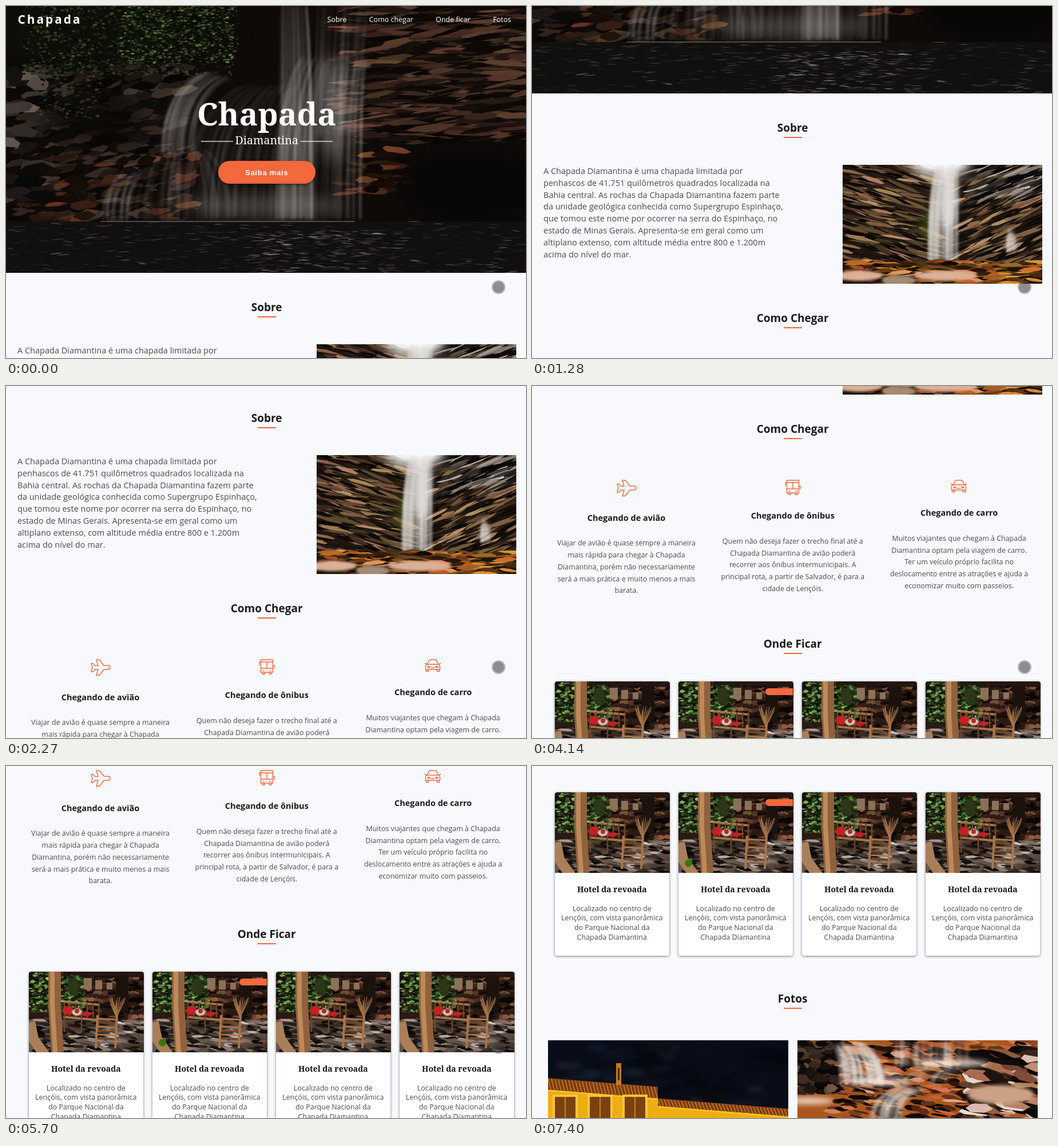
Recreate the animation shown at these times as an HTML page with a canvas. Size 909 by 616 pixels, loop 8 s.

```html
<!DOCTYPE html>
<html lang="pt-BR">
<head>
<meta charset="utf-8">
<title>Chapada Diamantina</title>
<style>
html, body { margin: 0; width: 100%; height: 100%; overflow: hidden; background: #f8f9fc; }
#stage { position: fixed; inset: 0; overflow: hidden; contain: strict; }
#page { position: absolute; inset: 0; }
canvas, .card, svg, nav { position: absolute; }
svg { left: 0; top: 0; overflow: visible; }
.card { top: 1302px; width: 200.5px; height: 286px; border-radius: 4px; background: #fff; box-shadow: 0 1px 4px rgba(0,0,0,.5); }
.card canvas { border-radius: 4px 4px 0 0; }
nav { right: 26px; top: 15px; display: flex; gap: 39.3px; font: 12.48px/17px "Open Sans", sans-serif; color: #fff; }
nav :first-child { height: 21px; border-bottom: 1.6px solid #dc603b; }
#dot { position: absolute; left: 849px; top: 480px; width: 20px; height: 20px; border-radius: 50%;
  border: 2px solid rgba(90,88,82,.42); background: rgba(60,60,60,.57); background-clip: padding-box; }
text { font-family: "Open Sans", sans-serif; fill: #4c4c4c; }
.logo { font-size: 20.8px; font-weight: 700; letter-spacing: 3px; fill: #fff; }
.hero { font: bold 55px "Noto Serif", serif; fill: #fff; }
.sub { font: 300 19.6px "Noto Serif", serif; fill: #fff; }
.btn { font: bold 13px "Liberation Sans", Arial, sans-serif; letter-spacing: .75px; fill: #fff; }
.h2 { font-size: 19px; font-weight: 700; fill: #1c1a1a; }
.h3 { font-size: 14.5px; font-weight: 700; fill: #1c1a1a; }
.lead { font-size: 14.5px; }
.copy { font-size: 12.48px; }
.hotel { font: 600 14px "Noto Serif", serif; fill: #111; }
.icon { fill: none; stroke: #ee6a3e; stroke-width: 1.4; stroke-linejoin: round; stroke-linecap: round; }
</style>
</head>
<body>
<div id="stage"><div id="page"></div><div id="dot"></div></div>
<script>
const page = document.getElementById('page');
const ORANGE = '#f4683d', MID = 455.7;
let seed;
const rnd = (a = 0, b = 1) => {
  seed = (seed * 1664525 + 1013904223) >>> 0;
  return a + (b - a) * seed / 4294967296;
};

// ---------- photo helpers ----------
function photo(parent, x, y, w, h, paint) {
  const c = document.createElement('canvas');
  c.width = w; c.height = h;
  c.style.left = x + 'px'; c.style.top = y + 'px';
  parent.append(c);
  seed = 7;
  paint(c.getContext('2d'), w, h);
}
function box(g, color, x, y, w, h) { g.fillStyle = color; g.fillRect(x, y, w, h); }
function line(g, color, width, ...p) {
  g.strokeStyle = color; g.lineWidth = width;
  g.beginPath();
  for (let i = 0; i < p.length; i += 2) g.lineTo(p[i], p[i + 1]);
  g.stroke();
}
function glow(g, color, x, y, rx, ry, blur) {
  g.filter = `blur(${blur}px)`;
  g.fillStyle = color;
  g.beginPath(); g.ellipse(x, y, rx, ry, 0, 0, 7); g.fill();
  g.filter = 'none';
}
// slabs, leaves or ripples: mostly dark, a few lit
function scatter(g, n, [x, y, w, h], { hue = 20, sat = 30, max = 30, len = 40, thick = 8, tilt = 0, alpha = 1 }) {
  g.filter = 'blur(.5px)';
  for (let i = 0; i < n; i++) {
    const l = rnd(len / 4, len / 2), t = rnd(thick / 6, thick / 2);
    g.save();
    g.translate(x + rnd(0, w), y + rnd(0, h));
    g.rotate(tilt + rnd(-.15, .15));
    g.fillStyle = `hsla(${hue + rnd(-8, 8)},${sat}%,${3 + max * rnd() ** 2}%,${alpha})`;
    g.beginPath();
    for (let a = 0; a < 6; a++) g.lineTo(l * Math.cos(a + rnd(-.3, .3)), t * Math.sin(a));
    g.fill();
    g.restore();
  }
  g.filter = 'none';
}
// threads of water that leave an upper edge and curve down to a lower one
function fall(g, n, [x0, x1, y0], [x2, x3, y1], alpha) {
  g.filter = 'blur(2px)';
  g.lineWidth = 4;
  for (let i = 0; i < n; i++) {
    const k = rnd(), a = x0 + (x1 - x0) * k, b = x2 + (x3 - x2) * k, top = y0 + rnd(0, 15);
    const fade = g.createLinearGradient(0, top, 0, y1), glint = rnd(alpha / 4, alpha);
    [.4, 1, .6].forEach((s, j) => fade.addColorStop(j / 2, `rgba(228,224,220,${glint * s})`));
    g.strokeStyle = fade;
    g.beginPath();
    g.moveTo(a, top);
    g.quadraticCurveTo(b, top + (y1 - top) / 5, b, y1 - rnd(0, 8));
    g.stroke();
  }
  g.filter = 'none';
}

// ---------- photos ----------
function river(g, w, h) {
  const shore = 377;
  box(g, '#0e0a08', 0, 0, w, h);
  scatter(g, 420, [0, 100, 320, 275], { sat: 20, max: 22, len: 60, thick: 22, tilt: -.2 });
  scatter(g, 90, [40, 260, 290, 110], { sat: 48, max: 24, len: 55, thick: 18, tilt: -.2 });
  scatter(g, 30, [0, 110, 70, 230], { sat: 10, max: 38, len: 70, thick: 30 });
  scatter(g, 620, [590, 0, 320, 235], { sat: 34, max: 25, len: 95, thick: 13, tilt: -.08 });
  scatter(g, 60, [590, 250, 100, 80], { sat: 52, max: 27, len: 60, thick: 18 });
  glow(g, '#090706', 810, 315, 125, 70, 18);
  glow(g, '#0a0806', 150, 195, 80, 40, 22);
  glow(g, '#0c0f08', 180, 40, 220, 60, 16);
  scatter(g, 1500, [30, -5, 370, 125], { hue: 80, sat: 28, max: 20, len: 9, thick: 5 });
  scatter(g, 700, [200, 0, 205, 100], { hue: 82, sat: 38, max: 34, len: 8, thick: 4 });
  scatter(g, 250, [60, 100, 110, 100], { hue: 80, sat: 25, max: 18, len: 9, thick: 5 });

  fall(g, 60, [480, 525, -10], [478, 535, shore], .14);
  fall(g, 50, [545, 640, -10], [540, 625, 230], .1);
  fall(g, 80, [515, 630, 85], [470, 620, shore], .13);
  fall(g, 70, [410, 540, 135], [310, 520, shore], .11);
  fall(g, 50, [340, 395, 112], [270, 330, 262], .15);
  fall(g, 50, [280, 350, 245], [240, 400, shore], .1);
  fall(g, 25, [200, 250, 288], [168, 230, shore], .18);
  glow(g, 'rgba(225,222,218,.3)', 570, 180, 24, 90, 14);
  glow(g, 'rgba(225,222,218,.22)', 450, 350, 140, 18, 12);

  box(g, '#12100f', 0, shore, w, h);
  line(g, 'rgba(200,195,190,.45)', 1.5, 165, shore, 610, shore);
  const ripple = { sat: 8, max: 75, len: 26, thick: 2, alpha: .35 };
  scatter(g, 500, [0, shore, w, h - shore], ripple);
  scatter(g, 330, [420, shore + 15, 270, h - shore], { ...ripple, max: 95, alpha: .45 });
}

function canyon(g, w, h) {
  const stone = { hue: 28, sat: 32, max: 55, len: 70, thick: 8 };
  box(g, '#21170f', 0, 0, w, h);
  scatter(g, 420, [0, -5, 165, 180], { ...stone, tilt: .25 });
  scatter(g, 420, [195, -5, 160, 190], { ...stone, tilt: -.4 });
  scatter(g, 60, [220, 0, 130, 60], { ...stone, sat: 8, max: 80, tilt: -.4 });
  glow(g, 'rgba(70,78,28,.7)', 150, 105, 14, 30, 8);
  glow(g, '#fff', 172, -2, 50, 22, 10);
  glow(g, 'rgba(255,255,255,.8)', 183, 50, 16, 60, 7);
  fall(g, 75, [165, 202, -5], [150, 202, 172], .45);
  fall(g, 14, [292, 297, 108], [286, 304, 156], .6);
  glow(g, '#a5601f', w / 2, 194, w / 2, 16, 4);
  scatter(g, 160, [0, 168, w, 40], { hue: 28, sat: 65, max: 60, len: 50, thick: 9 });
  for (const [x, r] of [[28, 42], [180, 56]]) glow(g, '#dcb096', x, 194, r, 9, 2);
  glow(g, '#a28a75', 98, 202, 30, 9, 2);
}

function porch(g, w, h) {
  const wood = '#a8764a', dark = '#70462a', floor = 84;
  box(g, '#2a1a12', 0, 0, w, h);
  scatter(g, 500, [0, 0, 100, 70], { hue: 95, sat: 38, max: 60, len: 11, thick: 6 });
  scatter(g, 150, [100, 0, 100, 85], { sat: 38, max: 40, len: 20, thick: 10 });
  line(g, '#24160f', 12, 60, 0, w, 4);
  glow(g, '#2c3718', 78, 26, 10, 17, 2);
  for (let i = 0; i < 3; i++) box(g, '#8b7159', 96 + i * 20, 11 + i * 4, 14 - i * 2, 20 - i * 4);
  box(g, '#1b120d', 152, 8, 22, 62);
  box(g, '#685648', 0, floor, w, h);
  scatter(g, 200, [0, floor, w, h - floor], { sat: 13, max: 75, len: 34, thick: 8, tilt: .12 });
  glow(g, 'rgba(30,18,10,.65)', 100, 94, 44, 10, 6);
  glow(g, 'rgba(25,15,10,.5)', w, h, 45, 25, 10);
  // bench
  for (const y of [52, 79]) line(g, wood, 4, 60, y, 124, y + 6);
  for (let x = 62; x <= 122; x += 10) line(g, dark, 2.5, x, 54, x, x % 30 === 2 ? 106 : 80);
  ['#c81f24', '#d9cdbd', '#c81f24'].forEach((c, i) => glow(g, c, 68 + i * 16, 68 + i * 3, 9, 8 - i * 2, .8));
  glow(g, '#be2428', 84, 69, 4, 4, .5);
  // dry grass and chair
  for (let i = 0; i < 24; i++) line(g, wood, .8, 153, 80, 153 + rnd(-16, 16), rnd(42, 56));
  for (let y = 82; y < 118; y += 7) line(g, y % 2 ? dark : wood, 3, 121, y, 153, y + 2);
  for (const x of [120, 154]) line(g, wood, 4, x, 76, x - 3, 134);
  // tree posts
  line(g, '#8f613d', 22, 45, 0, 45, 60, 50, h);
  line(g, '#bd8a5b', 8, 41, 0, 41, 60, 46, h);
  line(g, '#a97f59', 18, 2, 88, 8, 118, 30, h + 8);
}

function village(g, w, h) {
  box(g, '#080d19', 0, 0, w, h);
  for (let i = 0; i < 70; i++)
    glow(g, `hsla(222,${rnd(15, 45)}%,${3 + 19 * rnd() ** 2}%,.8)`, rnd(0, w), rnd(8, 110), rnd(8, 40), rnd(2, 8), 4);
  // a tiled roof above a lit wall
  const house = (x, y, width, roof) => {
    g.save();
    g.transform(1, .08, 0, 1, x, y);
    box(g, '#edae14', 0, roof, width, h);
    box(g, '#7b3b12', 0, 0, width, roof);
    for (let t = 0; t < width; t += 6) line(g, '#d5841d', 1.5, t, 1, t + 5, roof);
    line(g, '#ffc52e', 2, 0, roof + 2, width, roof + 2);
    g.restore();
  };
  house(185, 101, w, 13);
  house(0, 66, 192, 20);
  box(g, '#c17e16', 119, 40, 9, 38);
  box(g, '#4d270d', 122, 48, 3, 22);
  for (let x = 8; x < 180; x += 61) {
    box(g, '#ffc636', x, 95, 44, h);
    box(g, '#7a4210', x + 4, 99, 36, h);
    line(g, '#c8811b', 2, x + 22, 99, x + 22, h);
  }
}

function cascade(g, w, h) {
  box(g, '#a9561f', 0, 0, w, h);
  scatter(g, 420, [60, 0, 360, h], { sat: 58, max: 68, len: 44, thick: 11, tilt: .15 });
  scatter(g, 150, [0, 0, 70, 90], { sat: 28, max: 35, len: 30, thick: 18 });
  scatter(g, 110, [300, 20, 130, 125], { sat: 38, max: 85, len: 75, thick: 24, tilt: .2 });
  glow(g, '#cda185', 355, 95, 58, 17, 3);
  fall(g, 60, [62, 110, 2], [75, 150, 80], .6);
  fall(g, 55, [165, 300, -5], [165, 300, 50], .4);
  fall(g, 40, [150, 300, 46], [100, 270, 80], .35);
  fall(g, 30, [175, 225, 76], [125, 180, h], .5);
  for (let i = 0; i < 3; i++) glow(g, 'rgba(255,244,235,.8)', 20 + i * 125, 106 - i * 33, 45 + i * 10, 6, 5);
}

photo(page, 0, 0, 909, 467, river);
photo(page, 543, 592, 349, 208, canyon);
photo(page, 28, 1736, 420, 144, village);
photo(page, 464, 1736, 420, 144, cascade);

// ---------- text and icons ----------
let art = '';
const text = (cls, x, y, s, anchor = 'middle') =>
  art += `<text class="${cls}" x="${x}" y="${y}" text-anchor="${anchor}">${s}</text>`;
const para = (cls, x, y, step, lines, anchor) => lines.split('|').forEach((s, i) => text(cls, x, y + i * step, s, anchor));
const bar = (x, y, w, h, color) => art += `<rect x="${x}" y="${y}" width="${w}" height="${h}" fill="${color}"/>`;
const icon = (x, d) => art += `<path class="icon" transform="translate(${x} 949)" d="${d}"/>`;
const heading = (s, y) => { text('h2', MID, y, s); bar(440, y + 9, 32, 2, ORANGE); };

page.insertAdjacentHTML('beforeend', '<nav><span>Sobre</span><span>Como chegar</span><span>Onde ficar</span><span>Fotos</span></nav>');
text('logo', 20.5, 31, 'Chapada', 'start');
text('hero', MID, 208.5, 'Chapada');
text('sub', MID, 242, 'Diamantina');
for (const x of [341, 515]) bar(x, 236.3, 56, 1.2, '#fff');
art += `<rect x="371" y="271" width="170" height="40" rx="20" fill="${ORANGE}" style="filter:drop-shadow(0 2px 2px rgba(0,0,0,.5))"/>`;
text('btn', MID, 296.3, 'Saiba mais');

heading('Sobre', 534);
para('lead', 20, 608, 20.8, 'A Chapada Diamantina é uma chapada limitada por|penhascos de 41.751 quilômetros quadrados localizada na|Bahia central. As rochas da Chapada Diamantina fazem parte|da unidade geológica conhecida como Supergrupo Espinhaço,|que tomou este nome por ocorrer na serra do Espinhaço, no|estado de Minas Gerais. Apresenta-se em geral como um|altiplano extenso, com altitude média entre 800 e 1.200m|acima do nível do mar.', 'start');

heading('Como Chegar', 867);
icon(148, 'M10 1h5l8 10h7q4 0 4 3.500t-4 3.500h-7l-8 10.500h-5l3-10.500H8l-4 4H1l2-7.500-2-7h3l4 4h5z');
icon(442, 'M3.500 1h21v22h-21zM3.500 5h21M3.500 16h21M14 5v11M3.500 5H1v5M24.500 11H27v5M6 23v3h4v-3M18 23v3h4v-3M7 20h2M19 20h2');
icon(732, 'M4 9l3-6q1-2 3-2h8q2 0 3 2l3 6M1.500 18v-5q0-4 3-4h19q3 0 3 4v5zM2.500 18v3.500h4V18M21.500 18v3.500h4V18M.5 7.500L4 9M27.500 7.500L24 9M5.500 12.500h3v2h-3zM19.500 12.500h3v2h-3zM11 15h6');
[
  [1020.5, 'Chegando de avião', 'Viajar de avião é quase sempre a maneira|mais rápida para chegar à Chapada|Diamantina, porém não necessariamente|será a mais prática e muito menos a mais|barata.'],
  [1017, 'Chegando de ônibus', 'Quem não deseja fazer o trecho final até a|Chapada Diamantina de avião poderá|recorrer aos ônibus intermunicipais. A|principal rota, a partir de Salvador, é para a|cidade de Lençóis.'],
  [1012, 'Chegando de carro', 'Muitos viajantes que chegam à Chapada|Diamantina optam pela viagem de carro.|Ter um veículo próprio facilita no|deslocamento entre as atrações e ajuda a|economizar muito com passeios.']
].forEach(([y, title, body], i) => {
  const x = 165 + i * 290.8;
  text('h3', x, y, title);
  para('copy', x, y + 43.7, 20.8, body);
});

heading('Onde Ficar', 1243);
for (let i = 0; i < 4; i++) {
  const x = 39.5 + i * 216, card = document.createElement('div');
  card.className = 'card';
  card.style.left = x + 'px';
  page.append(card);
  photo(card, 0, 0, 201, 141, porch);
  text('hotel', x + 100.3, 1477, 'Hotel da revoada');
  para('copy', x + 100.3, 1509.5, 16.7, 'Localizado no centro de|Lençóis, com vista panorâmica|do Parque Nacional da|Chapada Diamantina');
}
art += `<path d="M456 1314h-42a6 6 0 0 0 0 12h42z" fill="${ORANGE}"/><circle cx="273.7" cy="1426" r="6.5" fill="#38760f"/>`;
heading('Fotos', 1670);
page.insertAdjacentHTML('beforeend', `<svg width="909" height="616">${art}</svg>`);

// ---------- scrolling in jumps ----------
const LOOP = 8000, STEP = 157;
const times = [0, 500, 1280, 2270, 3210, 4140, 5700, 6460, 7400, LOOP];
const last = times.length - 2;
const play = (el, style) => el.animate(
  times.map((t, i) => ({ offset: t / LOOP, easing: 'step-end', ...style(Math.min(i, last)) })),
  { duration: LOOP, iterations: Infinity });
play(page, i => ({ transform: `translateY(${-STEP * i}px)` }));
play(document.getElementById('dot'), i => ({ opacity: i < last ? 1 : 0 }));
</script>
</body>
</html>
```
